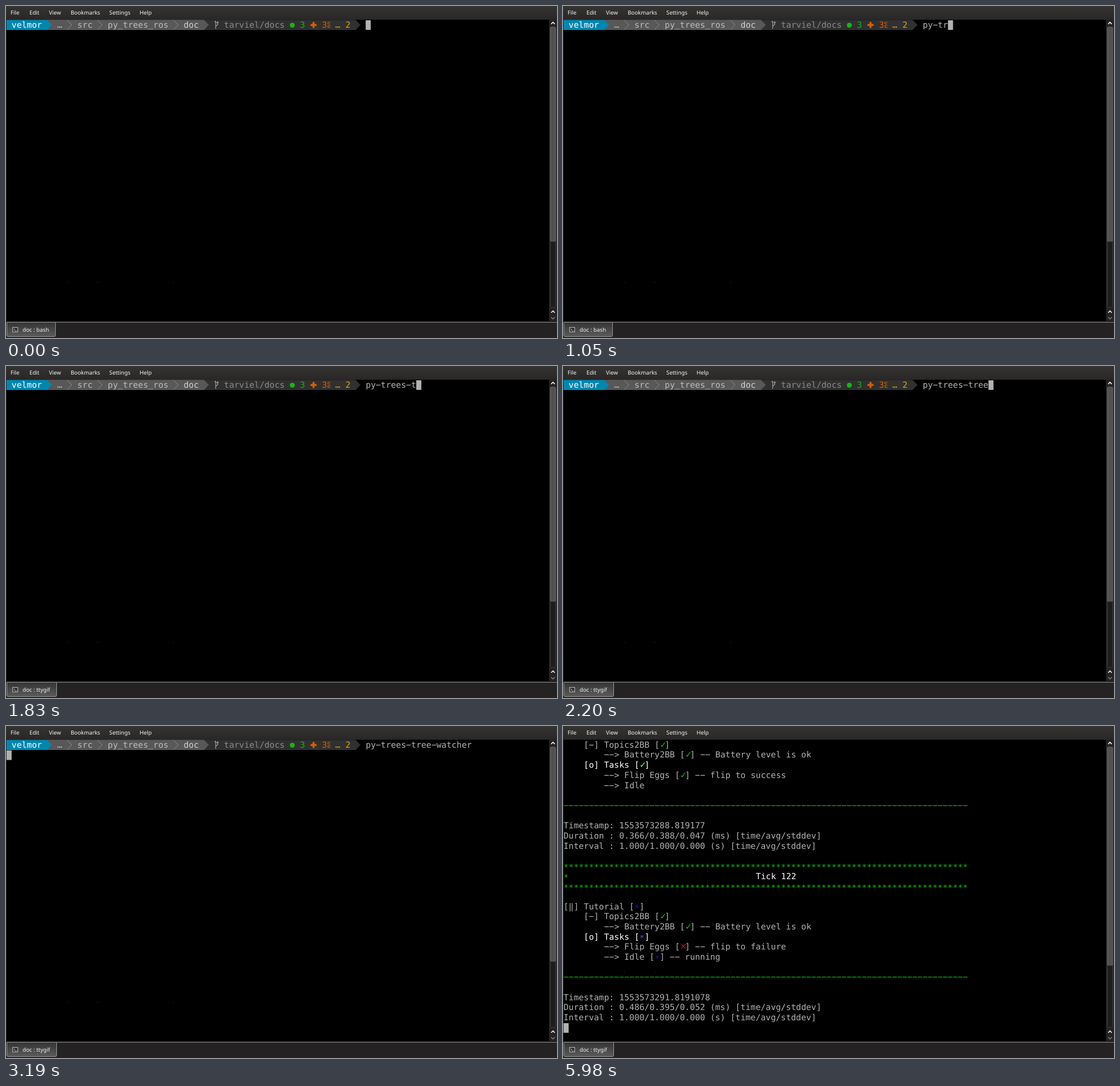
These frames come from a looping animation (963 px wide and 581 px high, 8000 ms). An HTML page:

```html
<!DOCTYPE html>
<html lang="en">
<head>
<meta charset="utf-8">
<title>Tree watcher</title>
<style>
html, body { margin: 0; width: 100%; height: 100%; overflow: hidden; background: #000; }
svg { display: block; width: 963px; height: 581px; }
text { white-space: pre; text-rendering: geometricPrecision; }
.ui text { font: 9.7px "Noto Sans", sans-serif; fill: #f4f4f4; }
.term text { font: 14.684px "DejaVu Sans Mono", monospace; }
.term .mark { font-family: "DejaVu Sans", sans-serif; }
</style>
</head>
<body>
<svg id="stage" viewBox="0 0 963 581" xmlns="http://www.w3.org/2000/svg">
  <defs>
    <linearGradient id="bar" x2="0" y2="1"><stop stop-color="#363433"/><stop offset="1" stop-color="#292727"/></linearGradient>
    <linearGradient id="tabFill" x2="0" y2="1"><stop stop-color="#353434"/><stop offset="1" stop-color="#5c5b5b"/></linearGradient>
    <linearGradient id="thumbFill"><stop stop-color="#5a5959"/><stop offset=".5" stop-color="#504f4f"/><stop offset="1" stop-color="#5a5959"/></linearGradient>
    <clipPath id="view"><rect y="24" width="949" height="527"/></clipPath>
  </defs>
  <rect width="963" height="581" fill="#242222"/>
  <rect width="963" height="24" fill="url(#bar)"/>
  <rect x="1" y="24" width="948" height="527" fill="#000"/>
  <g class="term" clip-path="url(#view)">
    <g id="screen"></g>
    <g id="specks" fill="#242424"></g>
    <rect id="cursor" width="8.84" height="16.8" fill="#b2b2b2"/>
  </g>
  <g fill="none">
    <rect x="951.5" y="36.5" width="9" height="491" rx="2" fill="#1e1d1d" stroke="#403f3f"/>
    <rect id="thumb" x="951" y="37" width="10" rx="2" fill="url(#thumbFill)" stroke="#686767" stroke-width=".6"/>
    <g stroke="#f4f4f4" stroke-width="1.5">
      <path d="M952.8 31.6l3.2-3.2 3.2 3.2M952.8 536.8l3.2-3.2 3.2 3.2"/>
      <path d="M952.8 544.6l3.2 3.2 3.2-3.2" stroke="#777"/>
    </g>
  </g>
  <g class="ui">
    <g id="menu"></g>
    <rect y="551" width="963" height="2" fill="#1b1a1a"/>
    <path id="rule" fill="none" stroke="#8c8b8b"/>
    <path id="tab" fill="url(#tabFill)" stroke="#9a9999"/>
    <rect x="11.5" y="562.5" width="9" height="8" fill="#333" stroke="#b8b8b8"/>
    <path d="M13.5 564.8l1.8 1.7-1.8 1.7M16 568.6h2.6" fill="none" stroke="#ddd" stroke-width=".9"/>
    <text id="title" x="29" y="569.6"></text>
  </g>
</svg>
<script>
const NS = 'http://www.w3.org/2000/svg';
const $ = id => document.getElementById(id);
const CELL = 8.84, ROW = 17.68, LOOP = 8000, CMD_COL = 71;
const KEYS = [450, 550, 770, 880, 1050, 1110, 1220, 1550, 1700, 1830, 1990,
  2050, 2200, 2310, 2420, 2540, 2650, 2850, 2930, 3010, 3100];
const RENAME = 1110, ENTER = 3190, FIRST = 3470, SECOND = 5980;
const COLORS = { n: '#b2b2b2', w: '#ffffff', g: '#18b218', G: '#54ff54',
  b: '#1818b2', B: '#5454ff', r: '#b21818' };
const NUDGE = { '*': 2.5, '_': -0.8 }; // vertical glyph offsets

function add(parent, tag, attrs, text) {
  const el = document.createElementNS(NS, tag);
  for (const k in attrs) el.setAttribute(k, attrs[k]);
  if (text !== undefined) el.textContent = text;
  parent.appendChild(el);
  return el;
}

const colX = col => 1 + col * CELL;
// the terminal shows hyphens as wide as a minus sign
const wide = s => s.replace(/-/g, '\u2212');
const CMD = wide('py-trees-tree-watcher');

function put(parent, col, row, fill, str) {
  const el = add(parent, 'text', { x: colX(col), y: 37.8 + row * ROW, fill });
  if (/[✓✕]/.test(str)) el.setAttribute('class', 'mark');
  let shift = 0;
  wide(str).split(/(\*+|_+)/).filter(Boolean).forEach(part => {
    const next = NUDGE[part[0]] || 0;
    add(el, 'tspan', { dy: next - shift }, part);
    shift = next;
  });
  return el;
}

// "~x" switches to colour x; runs stay on the character grid
function line(parent, row, src) {
  let col = 0, color = COLORS.n;
  src.split(/(~\w)/).forEach(part => {
    if (/^~\w$/.test(part)) { color = COLORS[part[1]]; return; }
    const lead = part.length - part.trimStart().length;
    if (part.trim()) put(parent, col + lead, row, color, part.trim());
    col += part.length;
  });
}

function report(row, d) {
  const g = add($('screen'), 'g', {});
  const stars = '~g' + '*'.repeat(80);
  [stars, '~g*' + ' '.repeat(37) + '~wTick ' + d.tick, stars, '',
    `[‖] Tutorial [${d.root}~n]`,
    '    [-] Topics2BB [~g✓~n]',
    '        --> Battery2BB [~g✓~n] -- Battery level is ok',
    `~w    [o] Tasks [${d.tasks}~w]`,
    `        --> Flip Eggs [${d.flip}`,
    `        --> Idle${d.idle}`, '',
    '~g' + '-'.repeat(80), '',
    'Timestamp: ' + d.stamp,
    `Duration : ${d.took} (ms) [time/avg/stddev]`,
    'Interval : 1.000/1.000/0.000 (s) [time/avg/stddev]'
  ].forEach((s, i) => line(g, row + i, s));
  return g;
}

function prompt() {
  const g = add($('screen'), 'g', {});
  const arrow = (from, to, fill) => add(g, 'path',
    { d: `M${colX(from)} 24.3H${colX(to)}l8.6 8.8-8.6 8.8H${colX(from)}z`, fill });
  arrow(8, 69, '#303030');
  arrow(8, 39, '#585858');
  arrow(0, 8, '#0087af');
  [12, 18, 33].forEach(c =>
    add(g, 'path', { d: `M${colX(c)} 25l8 8.1-8 8.1`, fill: 'none', stroke: '#8f8f8f' }));
  const words = [[1, 'velmor', '#fff'], [10, '…', '#bcbcbc'], [14, 'src', '#bcbcbc'],
    [20, 'py_trees_ros', '#bcbcbc'], [35, 'doc', '#d0d0d0'], [43, 'tarviel/docs', '#8a8a8a'],
    [58, '3', '#18b218'], [62.35, '3', '#d75f00'], [65, '…', '#e0a010'], [67, '2', '#e0a010']];
  words.forEach(([c, s, fill]) => put(g, c, 0, fill, s));
  add(g, 'path', { d: 'M366.5 26v14M366.5 35.5l3.5-3v-4M364.5 28.5l2-2.5M368 30l2-2.5 1.5 2',
    fill: 'none', stroke: '#a0a0a0', 'stroke-width': 1.2 });
  add(g, 'circle', { cx: 500.4, cy: 33.6, r: 4.4, fill: '#18b218' });
  add(g, 'path', { d: 'M537.5 28v10.6M532.2 33.3h10.6', stroke: '#d75f00', 'stroke-width': 3.4 });
  add(g, 'path', { d: 'M567 28.5h-4.5v3h4M567 34.5h-4.5v3h4.5', fill: 'none', stroke: '#d75f00' });
  return put(g, CMD_COL, 0, COLORS.n, '');
}

[[8, 'File'], [41, 'Edit'], [75, 'View'], [113, 'Bookmarks'], [180.6, 'Settings'], [233.5, 'Help']]
  .forEach(([x, s]) => add($('menu'), 'text', { x, y: 15.4 }, s));
[12, 18, 33].forEach(c =>
  add($('specks'), 'rect', { x: colX(c) - 0.8, y: 483, width: 2, height: 1 }));

const command = prompt();
const first = report(2, { tick: 119, root: '~g✓', tasks: '~G✓',
  flip: '~g✓~n] -- flip to success', idle: '',
  stamp: '1553573288.819177', took: '0.366/0.388/0.047' });
const second = report(19, { tick: 122, root: '~b*', tasks: '~B*',
  flip: '~r✕~n] -- flip to failure', idle: ' [~b*~n] -- running',
  stamp: '1553573291.8191078', took: '0.486/0.395/0.052' });

const show = (el, on) => el.setAttribute('visibility', on ? 'visible' : 'hidden');

function draw(t) {
  const typed = KEYS.filter(k => k <= t).length;
  const renamed = t >= RENAME, scrolled = t >= SECOND;
  command.textContent = CMD.slice(0, typed);
  show(first, t >= FIRST);
  show(second, scrolled);
  $('screen').setAttribute('transform', `translate(0 ${scrolled ? -7 * ROW : 0})`);
  $('specks').setAttribute('transform', `translate(0 ${scrolled ? -3 * ROW : 0})`);

  const row = scrolled ? 28 : t >= FIRST ? 18 : t >= ENTER ? 1 : 0;
  $('cursor').setAttribute('x', colX(row ? 0 : CMD_COL + typed));
  $('cursor').setAttribute('y', 25 + row * ROW);
  $('thumb').setAttribute('height', scrolled ? 382 : 375);

  const edge = renamed ? 88.5 : 86.5;
  $('title').textContent = renamed ? 'doc : ttygif' : 'doc : bash';
  $('tab').setAttribute('d', `M1.5 553.5H${edge}V576.5q0 2-2 2H3.5q-2 0-2-2z`);
  $('rule').setAttribute('d', `M${edge} 553.5H963`);
}

const start = performance.now();
function tick() {
  draw((performance.now() - start) % LOOP);
  requestAnimationFrame(tick);
}
tick();
</script>
</body>
</html>
```
